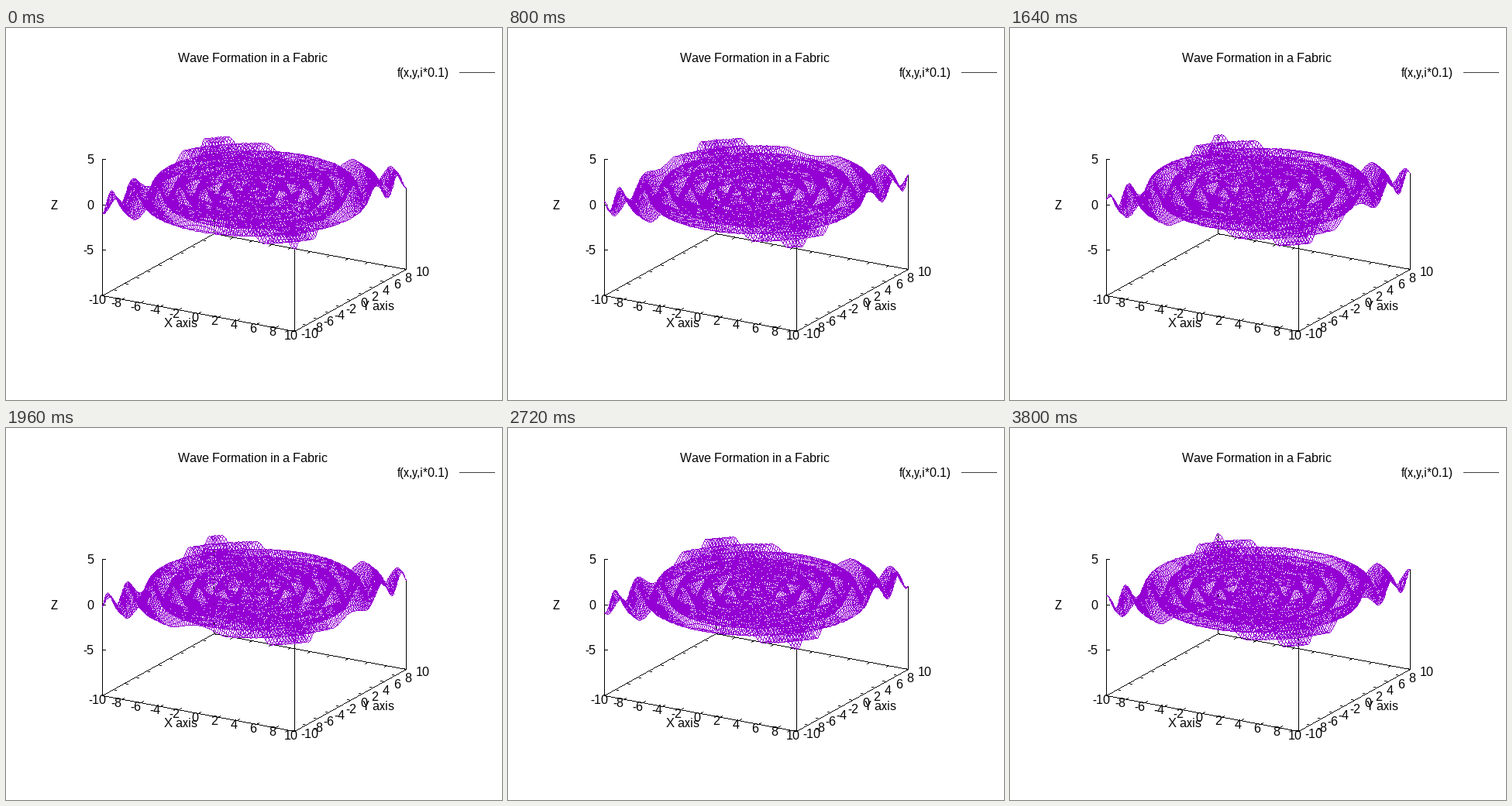
These frames come from a looping animation (640 px wide and 480 px high, 3840 ms). A matplotlib script:

```python
import numpy as np
import matplotlib.pyplot as plt
from matplotlib.animation import FuncAnimation

W, H = 640, 480
FRAMES, INTERVAL = 96, 40
BLACK, GREY, PURPLE = (0, 0, 0), (64, 64, 64), (148, 0, 211)
FLOOR, TOP = -10, 5
TICKS = range(-10, 11, 2)

plt.rcParams.update({
    "font.family": "Liberation Sans",
    "font.size": 16,
    "text.hinting": "default",
    "text.hinting_factor": 1,
})

C30, S30 = np.cos(np.pi / 6), np.sin(np.pi / 6)


def project(x, y, z):
    """Map a point of the plot box to whole screen pixels."""
    x, y, z = np.broadcast_arrays(x, y, z)
    px = 320 + 14.34 * (x * C30 + y * S30)
    py = 328 + 4.615 * (x * S30 - y * C30) - 11.73 * (z - FLOOR)
    return np.rint(np.stack([px, py], axis=-1))


def trace(img, a, b, color):
    """Draw hard-edged one-pixel segments from points a to points b."""
    a, b = np.asarray(a, float), np.asarray(b, float)
    steps = np.abs(b - a).max(axis=-1, keepdims=True)
    k = np.arange(int(steps.max()) + 1)
    t = np.minimum(k / np.maximum(steps, 1), 1)[..., None]
    pts = np.rint(a[..., None, :] + (b - a)[..., None, :] * t).astype(int)
    img[pts[..., 1], pts[..., 0]] = color


def wave(x, y, t):
    return np.sin(3 * np.hypot(x, y) + t)


def base_image():
    img = np.full((H, W, 3), 255, np.uint8)
    ring = [(-10, -10), (10, -10), (10, 10), (-10, 10)]
    for p, q in zip(ring, ring[1:] + ring[:1]):
        trace(img, project(*p, FLOOR), project(*q, FLOOR), BLACK)
    trace(img, project(-10, -10, FLOOR), project(-10, -10, TOP), BLACK)
    for v in TICKS:
        for side in (-10, 10):
            inward = -np.sign(side)
            a = project(v, side, FLOOR)
            trace(img, a, a + inward * np.array([3, -2]), BLACK)
            a = project(side, v, FLOOR)
            trace(img, a, a + inward * np.array([4, 1]), BLACK)
    for z in (-5, 0, 5):
        a = project(-10, -10, z)
        trace(img, a, a + [4, 0], BLACK)
    trace(img, (585, 57), (630, 57), GREY)
    return img


BASE = base_image()
GRID_X, GRID_Y = np.meshgrid(np.linspace(-10, 10, 100),
                             np.linspace(-10, 10, 100))


def render(i):
    t = i * 0.1
    img = BASE.copy()
    for x, y in ((10, -10), (10, 10), (-10, 10)):
        trace(img, project(x, y, FLOOR), project(x, y, wave(x, y, t)), BLACK)
    p = project(GRID_X, GRID_Y, wave(GRID_X, GRID_Y, t))
    trace(img, p[:, :-1], p[:, 1:], PURPLE)
    trace(img, p[:-1], p[1:], PURPLE)
    return img


fig = plt.figure(figsize=(W / 72, H / 72), dpi=72, facecolor="white")
ax = fig.add_axes([0, 0, 1, 1])
ax.axis("off")
picture = ax.imshow(render(0), interpolation="nearest", aspect="auto")
ax.set_xlim(-0.5, W - 0.5)
ax.set_ylim(H - 0.5, -0.5)


def label(x, y, text, align="center"):
    ax.text(x, y, str(text), ha=align, va="baseline", color="black")


label(318.5, 43, "Wave Formation in a Fabric")
label(571.5, 62, "f(x,y,i*0.1)", "right")
label(225.5, 385, "X axis")
label(480, 363, "Y axis")
label(62, 233, "Z")
for k, v in enumerate(TICKS):
    # non-negative numbers keep room for a sign
    pad = 4.4 if v >= 0 else 0
    label(117.5 + 24.8 * k + pad / 2, 355 + 4.65 * k, v)
    label(380 + 14.4 * k + pad, 400 - 8.05 * k, v, "left")
for z in (-5, 0, 5):
    label(113, 233 - 11.73 * z, z, "right")


def update(i):
    picture.set_data(render(i))
    return (picture,)


anim = FuncAnimation(fig, update, frames=FRAMES, interval=INTERVAL, repeat=True)
plt.show()
```
